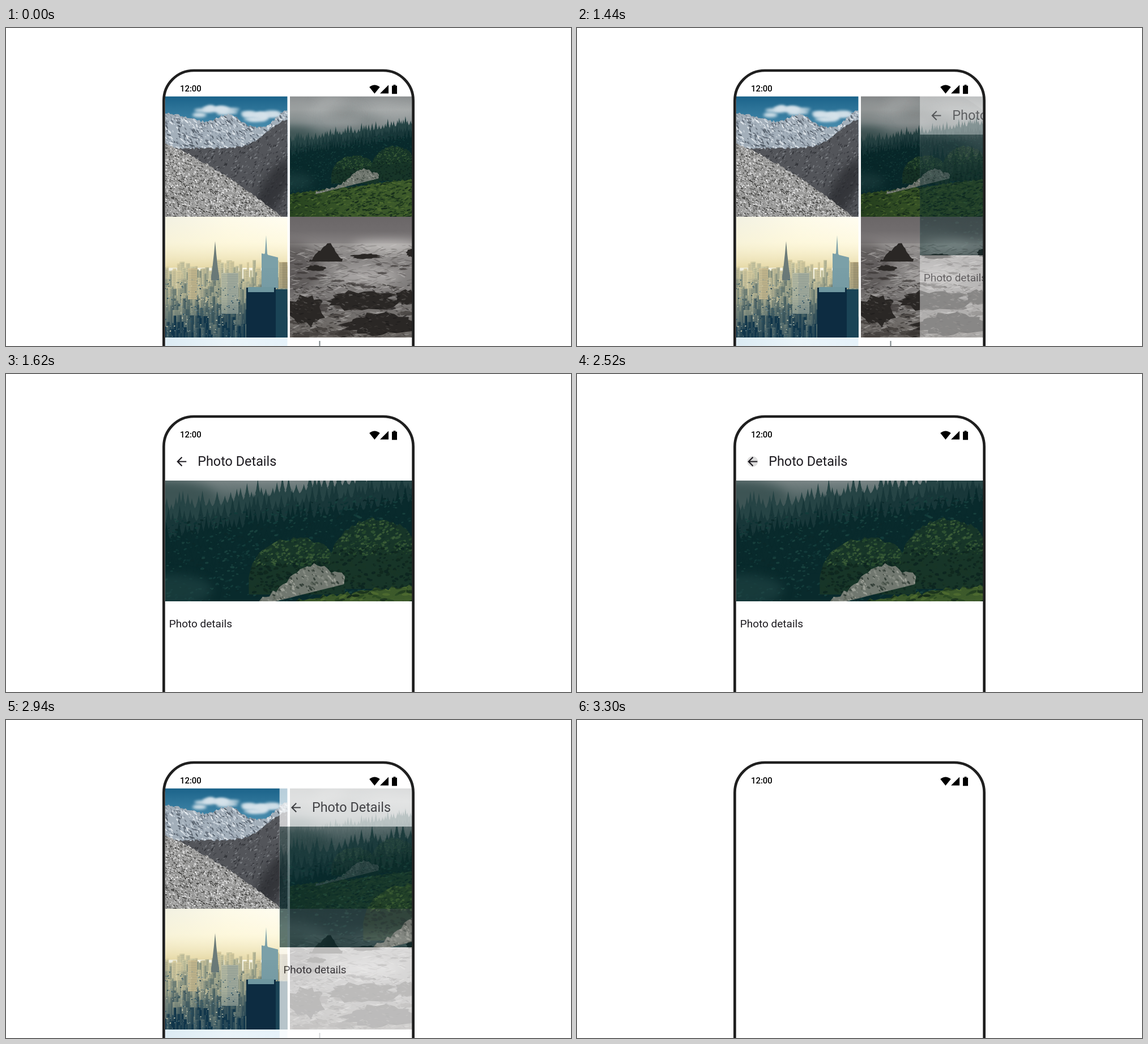
Animation, 997 px wide and 561 px high, one loop 3780 ms. Source, as an HTML page with a canvas:

```html
<!DOCTYPE html>
<html lang="en">
<head>
<meta charset="utf-8">
<title>Photo grid to details</title>
<style>
  html, body { margin: 0; width: 100%; height: 100%; overflow: hidden; background: #fff; }
  #stage { position: relative; width: 997px; height: 561px; overflow: hidden; }
  #stage svg, #stage canvas, #screen, #detail { position: absolute; left: 0; top: 0; }
  #screen { left: 281px; top: 120px; width: 436px; height: 441px; overflow: hidden; }
  #stage #tile { left: 220px; }
  #detail { width: 436px; height: 441px; background: #fff; }
  #stage #hero { top: 68px; }
  text { font-family: Roboto, sans-serif; fill: #1d1b20; }
</style>
</head>
<body>
<div id="stage">
  <div id="screen">
    <canvas id="grid" width="436" height="441"></canvas>
    <svg id="tile" width="216" height="213">
      <circle id="tileWave" cx="86" cy="178" fill="#000" fill-opacity=".1"/>
      <circle id="tileDot" cx="86" cy="178" r="9.5" fill="#dfe4e4" fill-opacity=".82" stroke="#eef2f2" stroke-opacity=".6"/>
    </svg>
    <div id="detail">
      <canvas id="hero" width="436" height="213"></canvas>
      <svg width="436" height="441" viewBox="281 120 436 441">
        <radialGradient id="shade">
          <stop offset=".3" stop-opacity=".13"/>
          <stop offset="1" stop-opacity=".07"/>
        </radialGradient>
        <circle id="backWave" cx="309.7" cy="154.4" fill="url(#shade)"/>
        <circle id="backDot" cx="309.7" cy="154.4" r="9.5" fill="#d5d5d5" fill-opacity=".8"/>
        <path transform="translate(297 141.7) scale(1.0625)" fill="#1d1b20"
          d="M20 11H7.83l5.59-5.59L12 4l-8 8 8 8 1.41-1.41L7.83 13H20z"/>
        <text x="338.2" y="162.4" font-size="23.4">Photo Details</text>
        <text x="287.7" y="446.7" font-size="19">Photo details</text>
      </svg>
    </div>
  </div>
  <svg width="997" height="561">
    <rect x="278.4" y="75" width="440.2" height="600" rx="53" fill="none" stroke="#1f1f1f" stroke-width="4.7"/>
    <text x="307" y="111.6" font-size="14.875" font-weight="500" style="fill:#000">12:00</text>
    <path d="M650.4 115.8 641.2 104.3Q650.4 96.8 659.7 104.3ZM660 115.6 675 100.4V115.6ZM681 101.7h2.6V100h3.8v1.7H690v14.6h-9Z"/>
  </svg>
</div>
<script>
const W = 216, H = 213;
const $ = id => document.getElementById(id);
const clamp = x => Math.min(1, Math.max(0, x));
const bump = (x, center, width) => Math.exp(-(((x - center) / width) ** 2));
const mix = (a, b, k) => `rgb(${a.map((v, i) => v + (b[i] - v) * k)})`;

let c, seed;
const rand = (a = 0, b = 1) => {
  seed = (seed * 16807) % 2147483647;
  return a + (b - a) * seed / 2147483647;
};
const pick = list => list[Math.floor(rand(0, list.length))];

const box = (x, y, w, h, color) => { c.fillStyle = color; c.fillRect(x, y, w, h); };
const fade = (x, y, ...colors) => {
  const g = c.createLinearGradient(0, 0, x, y);
  colors.forEach((color, i) => g.addColorStop(i / (colors.length - 1), color));
  return g;
};
const blob = (x, y, rx, ry, color, tilt = 0) => {
  c.fillStyle = color;
  c.beginPath();
  c.ellipse(x, y, rx, ry, tilt, 0, 7);
  c.fill();
};
const soft = (px, draw) => { c.filter = `blur(${px}px)`; draw(); c.filter = 'none'; };

// Fill between a rough skyline and a floor; the path can then be textured.
function land(color, top, { jag = 2, step = 3, from = 0, to = W, floor = () => H } = {}) {
  const path = new Path2D();
  for (let x = from; x < to + step; x += step) path.lineTo(x, top(x) + rand(-jag, jag));
  for (let x = to; x > from - step; x -= step) path.lineTo(x, floor(x));
  c.fillStyle = color;
  c.fill(path);
  return path;
}

// Scatter small flat flecks inside a path.
function fleck(path, n, y0, y1, size, flat, tilt, colors) {
  c.save();
  c.clip(path);
  while (n--) {
    const r = rand(.4, 1) * size;
    blob(rand(0, W), rand(y0, y1), r, r * flat, pick(colors), tilt + rand(-.5, .5));
  }
  c.restore();
}

function mountains() {
  box(0, 0, W, H, fade(0, 60, '#1b638a', '#4b8fb0'));
  soft(2.5, () => {
    for (let i = 0; i < 30; i++) {
      const x = rand(55, 200);
      blob(x, 30 + 6 * Math.sin(x / 20) + rand(-6, 6), rand(6, 16), rand(2, 5), '#d5e2ea');
    }
  });
  const peaks = land('#a3afba', x => 57 - 27 * bump(x, 0, 70) - 23 * bump(x, 112, 28) - 32 * bump(x, W, 28));
  fleck(peaks, 900, 25, 105, 4, .3, .8, ['#e2e8ed', '#cdd6de', '#69737f', '#545e69', '#8793a0']);
  const valley = land('#53555a', x => 92 - 50 * bump(x, W, 50));
  fleck(valley, 1300, 45, H, 3, .35, -.8, ['#393b40', '#65686d', '#7d8085', '#303237', '#46484d']);
  soft(8, () => blob(190, 165, 22, 60, '#26282cb0', .5));
  const snow = land('#9c9c9b', x => 82 + .45 * x + .0009 * x * x);
  fleck(snow, 3800, 80, H, 2, .5, .6, ['#d9d9d9', '#c2c2c2', '#4c4c4b', '#676765', '#3b3b39', '#ececec']);
}

function forest() {
  box(0, 0, W, H, fade(0, 95, '#8d9192', '#a5a9a9', '#8b9394', '#4e6262', '#1a3d3e'));
  soft(10, () => {
    for (let i = 0; i < 12; i++) blob(rand(0, W), rand(0, 45), rand(15, 35), rand(4, 10), pick(['#b9bcbc70', '#73797a70']));
    blob(0, 70, 45, 16, '#3d5454');
  });
  // Rows of firs, darker towards the viewer.
  for (let row = 0; row < 6; row++) {
    const ground = x => 76 + row * 12 - x * .15;
    const color = mix([38, 68, 69], [9, 42, 44], clamp(row / 2));
    land(color, x => ground(x) + 6);
    for (let x = -4; x < W + 6; x += rand(3, 7)) {
      const tall = rand(6, 17);
      for (let k = 0; k < 4; k++) {
        const y = ground(x) + 9 - tall + tall * k / 4, w = 1.2 + k * 1.1;
        c.beginPath();
        c.moveTo(x, y - 3);
        c.lineTo(x + w, y + tall / 3);
        c.lineTo(x - w, y + tall / 3);
        c.fill();
      }
    }
  }
  const slope = new Path2D('M0 88 216 62V213H0Z');
  fleck(slope, 1200, 65, 175, 1.8, .5, -.2, ['#0a2829', '#123b3a', '#0d3233', '#17403d']);
  soft(8, () => blob(5, 150, 36, 14, '#2348478c'));

  const leaves = ['#24472b', '#2f5233', '#19382a', '#132f26', '#3a5b37'];
  for (const [x, y, half, tall] of [[115, 140, 42, 35], [184, 135, 42, 47]]) {
    const crown = land('#173528', u => y - tall * Math.sqrt(clamp(1 - ((u - x) / half) ** 2)),
      { from: x - half, to: x + half, floor: () => y + 14 });
    fleck(crown, 1100, y - tall, y - tall / 3, 1.8, .6, -.3, leaves);
    fleck(crown, 800, y - tall / 2, y + 14, 2, .6, 0, ['#10291f', '#183526', '#0d2620']);
  }
  const grass = land(fade(W, 0, '#27431f', '#3a5729', '#3d5a2b'), x => 172 - .12 * x);
  fleck(grass, 900, 145, H, 4, .35, -.2, ['#4c692f', '#3f5d2a', '#1c351d', '#162c1b', '#2b4923', '#243f20']);
  const rocks = land('#717870', x => 180 - .25 * x - 20 * bump(x, 125, 25),
    { from: 46, to: 156, floor: x => 184 - .25 * x });
  fleck(rocks, 1100, 125, 175, 1.8, .5, .8, ['#9a9e95', '#858b82', '#48524a', '#36413a', '#5d665c']);
}

function tower(x, y, w, h, color) {
  box(x, y, w, h, color);
  box(x, y, w * .35, h, '#f3e6b438');
  for (let v = y + 3; v < y + h; v += 3) box(x + 1, v, w - 2, 1, '#1c42552c');
}

function city() {
  box(0, 0, W, H, fade(W, 0, '#f2f1e2', '#fdfae8', '#fffdf1'));
  box(0, 0, W, 90, fade(0, 90, '#fff6d400', '#fdf5d080', '#e6d9a8'));
  for (let row = 0; row < 8; row++) {
    for (let x = -6; x < W; x += rand(3, 8)) {
      const tone = clamp(row / 7 + rand(-.2, .2));
      tower(x, 74 + row * 16 + rand(0, 22), rand(4, 12), 60,
        rand() < .3 ? mix([218, 206, 160], [120, 135, 125], tone) : mix([200, 196, 158], [16, 52, 72], tone));
    }
  }
  land('#6c7b79', x => 112 - 55 * bump(x, 88, 5) - 14 * bump(x, 88, 1), { jag: 0, step: 1, from: 81, to: 95, floor: () => 112 });
  land('#7ba0a8', x => 64 + (x - 168) * .25 - 34 * bump(x, 178, 1.2), { jag: 0, step: 1, from: 170, to: 199, floor: () => 126 });
  tower(40, 91, 16, 55, '#c9ba8e');
  tower(201, 80, 16, 46, '#a99b75');
  tower(99, 99, 30, 72, '#a9b0a0');
  box(0, 90, W, 123, fade(0, H, '#0f364d00', '#0f364d00', '#0f364d10', '#0f364d90'));
  box(143, 125, 52, 88, '#0d2c41');
  box(195, 128, 21, 85, '#1a4456');
  box(146, 124, 46, 9, '#6f979f');
  const roofs = new Path2D('M0 110H140V213H0Z');
  fleck(roofs, 420, 110, H, 1.5, .6, 0, ['#d6d3b6', '#14384c', '#7b959a', '#24526a']);
}

// Rough-edged flat rock.
function rock(x, y, rx, ry, color) {
  c.beginPath();
  for (let a = 0; a < 6.28; a += .22) {
    const k = rand(.72, 1.12);
    c.lineTo(x + rx * k * Math.cos(a), y + ry * k * Math.sin(a));
  }
  c.fillStyle = color;
  c.fill();
}

function shore() {
  box(0, 0, W, 50, fade(0, 50, '#6a6667', '#716d6e', '#898585'));
  box(0, 47, W, H, fade(0, H, '#aaa7a5', '#8b8887', '#7c7978', '#67635f'));
  const sea = new Path2D('M0 48H216V213H0Z');
  soft(9, () => {
    blob(0, 90, 55, 45, '#514e4db0');
    blob(170, 52, 60, 7, '#d2cfcd');
    blob(135, 105, 60, 16, '#c0bdbba0');
  });
  fleck(sea, 900, 50, H, 9, .12, 0, ['#d0cdcb66', '#5a575566', '#b2afad66', '#45424066', '#75727066']);
  soft(.7, () => {
    for (let i = 0; i < 45; i++) {
      const depth = rand() ** .6;
      rock(rand(0, W), 62 + depth * 150, rand(4, 9) + depth * 12, 1 + depth * 4, '#3a3634b0');
    }
    land('#2a2725', x => 79 - 29 * bump(x, 68, 12) - 14 * bump(x, 50, 10) - 8 * bump(x, 82, 14),
      { from: 30, to: 92, floor: () => 79 });
    for (const [x, y, rx, ry] of [[134, 70, 26, 5], [45, 91, 18, 6], [125, 148, 66, 18], [160, 190, 74, 20], [28, 165, 34, 28], [206, 142, 22, 14], [214, 64, 9, 8]])
      rock(x, y, rx, ry, '#2a2725');
  });
  fleck(sea, 450, 120, H, 4, .3, .1, ['#48444280', '#1d1b1a99', '#85828066', '#35322f99']);
}

function photo(draw, x, y, w, h, scale = 1, shift = 0) {
  c.save();
  c.beginPath();
  c.rect(x, y, w, h);
  c.clip();
  c.translate(x, y + shift);
  c.scale(scale, scale);
  seed = 4711;
  draw();
  c.restore();
}

c = $('grid').getContext('2d');
photo(mountains, 0, .5, 215.5, H);
photo(forest, 220, .5, W, H);
photo(city, 0, 213, 215.5, H);
photo(shore, 220, 213, W, H);
box(0, 426, 215.5, 20, fade(W, 0, '#dcebf3', '#eaf4f9', '#e6f2fa'));
box(271.5, 432, 2, 9, '#7d8688');
c = $('hero').getContext('2d');
photo(forest, 0, 0, 436, H, 2.02, -110);

// Cubic curve (.42, 0, 1, 1), solved for its parameter by bisection.
function easeIn(x) {
  let lo = 0, hi = 1;
  for (let i = 0; i < 24; i++) {
    const s = (lo + hi) / 2;
    if (1.26 * s * (1 - s) ** 2 + 3 * s * s - 2 * s ** 3 < x) lo = s; else hi = s;
  }
  return 3 * lo * lo - 2 * lo ** 3;
}

function tap(name, age, r0, r1) {
  const wave = $(name + 'Wave');
  wave.setAttribute('r', r0 + (r1 - r0) * clamp(age / 225));
  wave.setAttribute('opacity', clamp(age / 75) * (1 - clamp((age - 250) / 150)));
  $(name + 'Dot').setAttribute('opacity', age >= 0 && age < 120 ? 1 : 0);
}

const LOOP = 3780, STEP = 30, SLIDE = 300;
function render(t) {
  const shown = t < 2200 ? clamp((t - 1307) / SLIDE) : 1 - clamp((t - 2846) / SLIDE);
  $('detail').style.transform = `translateX(${436 * (1 - easeIn(shown))}px)`;
  $('detail').style.opacity = shown;
  $('screen').style.visibility = t < 3300 ? 'visible' : 'hidden';
  tap('tile', t - 1140, 30, 200);
  tap('back', t - 2520, 8, 20.7);
}

const start = performance.now();
function tick() {
  const t = (performance.now() - start) % LOOP;
  render(Math.floor(t / STEP) * STEP);
  requestAnimationFrame(tick);
}
tick();
</script>
</body>
</html>
```
